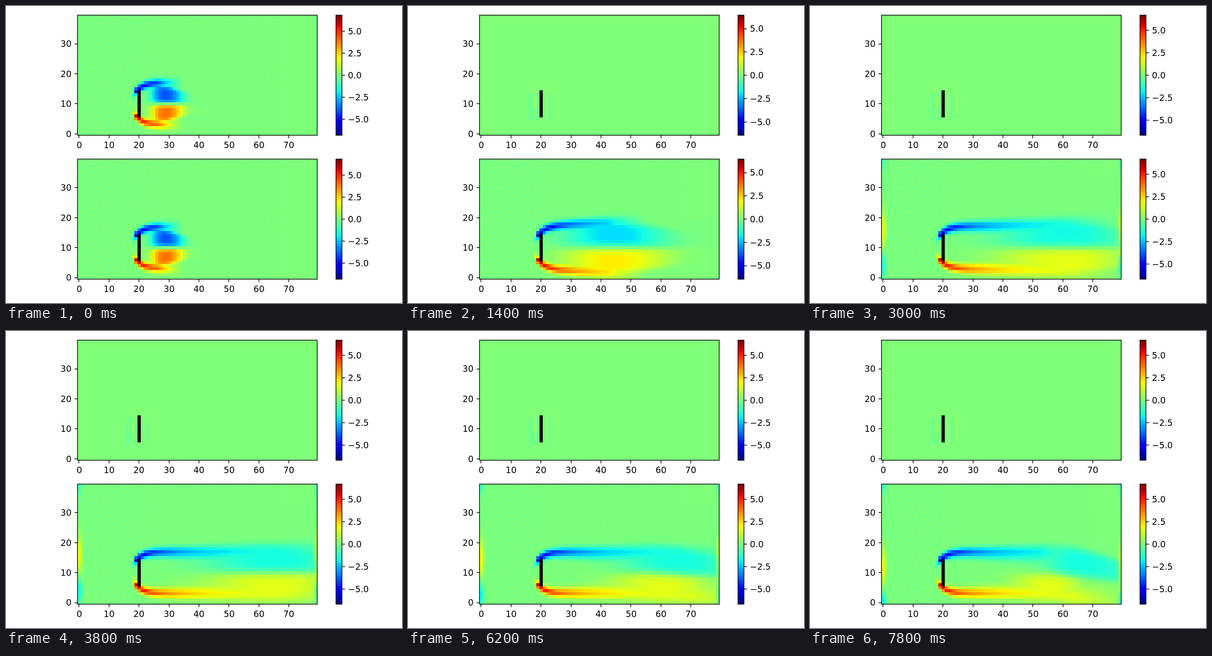
These frames come from a looping animation (864x648 px, 8 s). An HTML page with a canvas:

```html
<!DOCTYPE html>
<html lang="en">
<head>
<meta charset="utf-8">
<title>Vorticity behind a plate</title>
<style>
html, body { margin: 0; width: 100%; height: 100%; overflow: hidden; background: #fff; }
canvas { display: block; }
</style>
</head>
<body>
<canvas id="stage" width="864" height="648"></canvas>
<script>
const ctx = document.getElementById('stage').getContext('2d');
const COLS = 80, ROWS = 40, CELL = 6.54, LEFT = 156.2, STEP_MS = 200, STEPS = 40;
const HEIGHT = ROWS * CELL, BAR_X = 720, BAR_W = 13, TICK = 6.56;
const PLATE_X = 20, PLATE_Y = 10;

const clamp = (v, lo = 0, hi = 1) => Math.min(hi, Math.max(lo, v));
const gauss = (v, width) => Math.exp(-((v / width) ** 2));

// The wake grows downstream, settles, then starts to shed.
function poseAt(k) {
  const shed = clamp((k - 25) / 14);
  const size = 1 - 0.36 * Math.exp(-k / 3);
  const center = Math.min(66, 28.6 + 2.2 * k);
  const reach = Math.min(100, 35 + 3 * k);
  const side = (x, right, end) => ({
    x, right, end,
    left: Math.min(24, 4.5 + 1.7 * k) - 11 * shed,
    y: 5 * size,
    half: 4.8 * size,
    strength: 1.65 + 2.3 * Math.exp(-k / 4),
    lift: 2.2 * gauss(k - 9, 6)
  });
  const right = Math.min(18, 6 + 2 * k);
  return {
    k, shed,
    max: 6.69 - 0.25 * gauss(k - 7, 5) + 0.14 * Math.exp(-k),
    upper: side(center, right, reach - 30 * shed),
    lower: side(center - 10 * shed, right - 8 * shed, reach - 15 * shed)
  };
}

function coreAt(x, d, side) {
  const u = (x - side.x) / (x < side.x ? side.left : side.right);
  const taper = 1 - 0.3 * clamp(u, 0, 1.3);
  const v = (d - side.y * taper) / (side.half * taper);
  return side.strength * Math.exp(-(Math.abs(u) ** 2.6) - Math.abs(v) ** 4.4);
}

function shearAt(x, d, side) {
  const s = x - PLATE_X + 1;
  if (s < -1) return 0;
  const center = 4.2 + 2.8 * (1 - Math.exp(-s / 2.5)) + side.lift * (1 - Math.exp(-s / 20));
  const off = d - center;
  const width = off > 0 ? 1.15 + 0.03 * s : 1.15 + 0.07 * s;
  const strength = 1.5 + 4.4 * Math.exp(-s / 13);
  const fade = clamp(s + 1.2) * clamp((side.end - x) / (0.25 * side.end));
  return strength * fade * gauss(off, width);
}

function ripple(x, y) {
  const fade = 0.14 * Math.exp(-((x / 28) ** 4));
  return fade * (Math.sin(2.1 * (x + y)) * Math.sin(1.3 * (x - y)) - 0.3);
}

function borderFlow(x, y, k) {
  const share = x === 0 ? 1 : x === COLS - 1 ? 0.75 : x === 1 ? 0.3 : 0;
  const mid = 16 - 4 * clamp((k - 27) / 12);
  const band = 2 * gauss(y - mid, 6) - 1.8 * gauss(y - mid + 12, 4) - gauss(y - ROWS, 4);
  return clamp((k - 7) / 9) * share * band;
}

function flow(x, y, pose) {
  const axis = PLATE_Y - 3.2 * pose.shed * clamp((x - 55) / 22);
  const spin = (d, side) => Math.max(shearAt(x, d, side), coreAt(x, d, side));
  return spin(axis - y, pose.lower) - spin(y - axis, pose.upper)
    + ripple(x, y) + borderFlow(x, y, pose.k);
}

function restState(x, y) {
  const beside = x - PLATE_X;
  if (Math.abs(y - 9) < 5) {
    if (beside === -2) return y > 8 && y < 13 ? 0.4 : 0;
    if (beside === -1 || beside === 3 || beside === -3 || beside === -4) return -0.2;
  }
  const border = x < 4 || y > 36 || x > 76;
  const halo = Math.hypot(x - 21, y - 11) < 7;
  return border || halo ? 0.1 : 0;
}

function collapsing(x, y, pose) {
  const keep = pose.k < 5 ? 0.5 ** pose.k : 0;
  return keep * (keep && flow(x, y, pose)) + (1 - keep) * restState(x, y);
}

const JET = Array.from({ length: 256 }, (_, i) => {
  const v = i / 255;
  const red = Math.min((v - 0.35) / 0.31, 0.5 + (1 - v) / 0.22);
  const green = Math.min((v - 0.125) / 0.25, (0.91 - v) / 0.27);
  const blue = Math.min(0.5 + v / 0.22, (0.65 - v) / 0.31);
  return `rgb(${[red, green, blue].map(c => Math.round(255 * clamp(c))).join()})`;
});
const jet = v => JET[clamp(Math.floor(v * 256), 0, 255)];

function fillBox(x0, y0, x1, y1, color) {
  const [l, t, r, b] = [x0, y0, x1, y1].map(Math.round);
  ctx.fillStyle = color;
  ctx.fillRect(l, t, r - l, b - t);
}

// anchor: 0 left, 0.5 centre, 1 right
function label(text, x, y, anchor) {
  const start = x - anchor * ctx.measureText(text).width;
  ctx.fillText(text, Math.round(start), Math.round(y + 6.8));
}

const tickRight = (x, y) => ctx.fillRect(x, Math.round(y) - 0.75, TICK, 1.5);
const tickDown = (x, y) => ctx.fillRect(Math.round(x) - 0.75, y, 1.5, TICK);

function frame(x0, y0, x1, y1) {
  const [l, t, r, b] = [x0, y0, x1, y1].map(Math.round);
  ctx.strokeRect(l, t, r - l, b - t);
}

function drawField(bottom, field, pose) {
  for (let y = 0; y < ROWS; y++) {
    for (let x = 0; x < COLS; x++) {
      const plate = x === PLATE_X && Math.abs(y - PLATE_Y) < 5;
      const color = plate ? '#000' : jet(0.5 + field(x, y, pose) / (2 * pose.max));
      fillBox(LEFT + x * CELL, bottom - (y + 1) * CELL, LEFT + (x + 1) * CELL, bottom - y * CELL, color);
    }
  }
}

function drawPanel(top, field, pose) {
  const bottom = top + HEIGHT, barRight = BAR_X + BAR_W;
  drawField(bottom, field, pose);
  JET.forEach((color, i) => {
    const y = bottom - i * HEIGHT / 256;
    fillBox(BAR_X, y - HEIGHT / 256, barRight, y, color);
  });

  ctx.strokeStyle = ctx.fillStyle = '#000';
  ctx.lineWidth = 1.5;
  frame(LEFT, top, LEFT + COLS * CELL, bottom);
  frame(BAR_X, top, barRight, bottom);
  for (let v = 0; v < COLS; v += 10) {
    const x = LEFT + (v + 0.5) * CELL;
    tickDown(x, bottom);
    label(v, x, bottom + 21, 0.5);
  }
  for (let v = 0; v < ROWS; v += 10) {
    const y = bottom - (v + 0.5) * CELL;
    tickRight(LEFT - TICK, y);
    label(v, LEFT - 2 * TICK, y, 1);
  }
  for (let v = -5; v <= 5; v += 2.5) {
    const y = top + HEIGHT / 2 * (1 - v / pose.max);
    tickRight(barRight, y);
    label(v.toFixed(1).replace('-', '\u2212'), barRight + 2 * TICK, y, 0);
  }
}

let shown = -1;
function render(now) {
  const step = Math.floor(now / STEP_MS) % STEPS;
  if (step !== shown) {
    shown = step;
    const pose = poseAt(step);
    ctx.fillStyle = '#fff';
    ctx.fillRect(0, 0, 864, 648);
    ctx.font = '18.75px "DejaVu Sans", sans-serif';
    drawPanel(20.4, collapsing, pose);
    drawPanel(334.3, flow, pose);
  }
  requestAnimationFrame(render);
}
render(performance.now());
</script>
</body>
</html>
```
